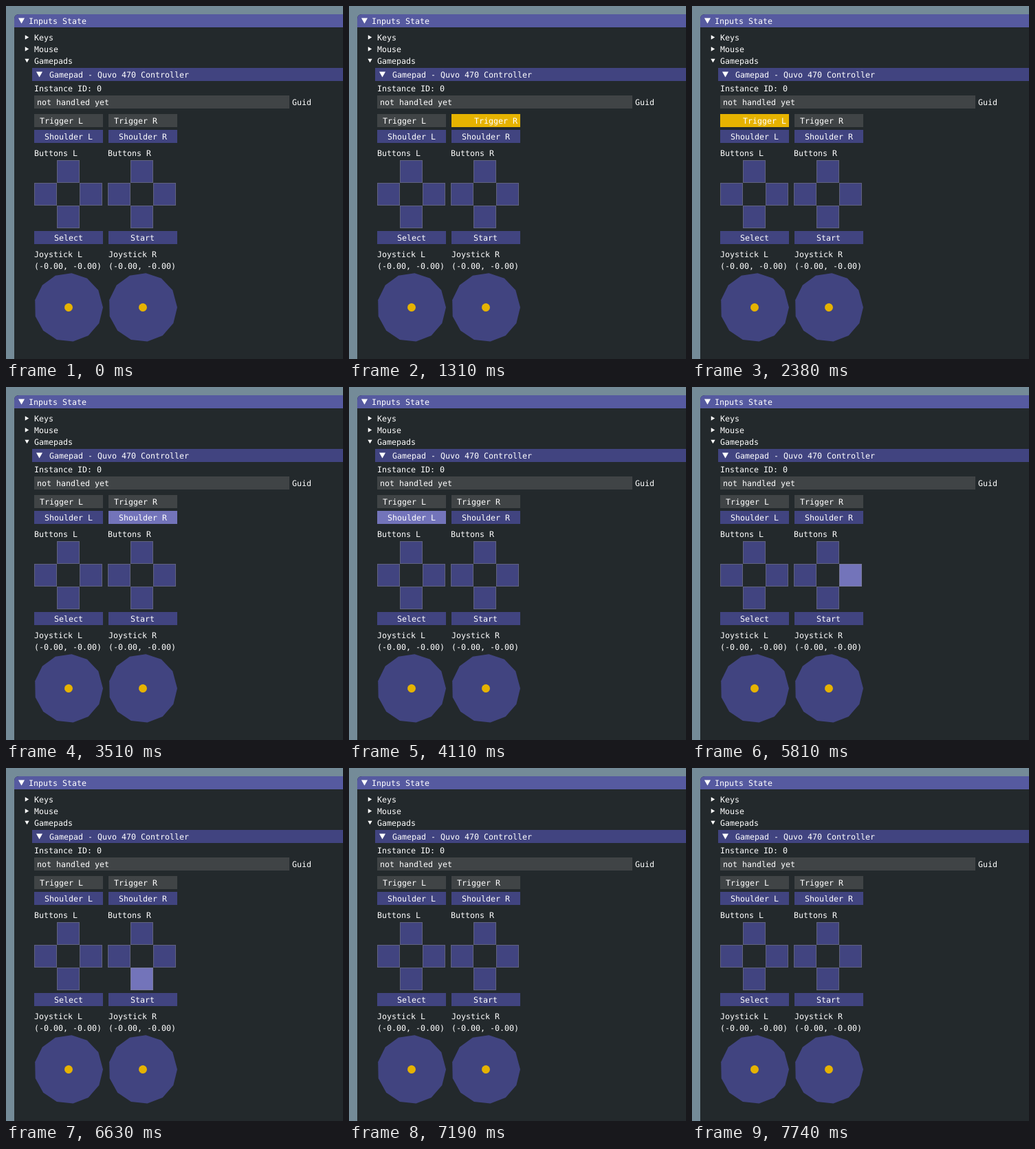
Animation of 490 by 513 pixels, one loop 8000 ms. Source, as an HTML page:

```html
<!DOCTYPE html>
<html lang="en">
<head>
<meta charset="utf-8">
<title>Inputs State</title>
<style>
  html, body { margin: 0; width: 100%; height: 100%; overflow: hidden; background: #748b98; }
  svg { display: block; }
  text {
    font: 11.63px "DejaVu Sans Mono", monospace;
    fill: #fff;
    text-rendering: geometricPrecision;
  }
</style>
</head>
<body>
<svg id="stage" width="490" height="513" viewBox="0 0 490 513"></svg>
<script>
const LOOP = 8000;
const BASE = '#414480', ACTIVE = '#7374ba', FRAME = '#404446', GOLD = '#e6b300';
const stage = document.getElementById('stage');

function add(tag, attrs, content = '') {
  const el = document.createElementNS('http://www.w3.org/2000/svg', tag);
  for (const key in attrs) el.setAttribute(key, attrs[key]);
  el.textContent = content;
  stage.append(el);
  return el;
}
const box = (x, y, width, height, fill) => add('rect', { x, y, width, height, fill });
const label = (x, y, content) => add('text', { x, y }, content);

// Triangle pointing along `turn` degrees
function arrow(x, y, r, turn) {
  add('path', {
    d: `M${r} 0L${-r / 2} ${r * .866}V${-r * .866}Z`, fill: '#fff',
    transform: `translate(${x} ${y}) rotate(${turn}) translate(${-r / 4} 0)`
  });
}

// Thirteen corners whose last side is slightly longer than the others
function disc(cx, cy, r, fill) {
  const step = 2 * Math.PI * 11 / 144;
  const points = Array.from({ length: 13 }, (_, i) =>
    [cx + r * Math.cos(i * step), cy + r * Math.sin(i * step)].map(v => v.toFixed(2)));
  add('polygon', { points: points.join(' '), fill });
}

const switches = [];
function addSwitch(el, on, off) {
  switches.push({ el, on, off });
}

function button(x, y, content, on, off) {
  addSwitch(box(x, y, 100, 19, BASE), on, off);
  label(x + Math.floor((100 - content.length * 7) / 2), y + 14, content);
}

function pad(x, y, times) {
  [[33, 0], [66, 33], [33, 66], [0, 33]].forEach(([dx, dy], i) => {
    addSwitch(box(x + dx, y + dy, 33, 33, BASE), ...(times[i] || []));
    add('rect', {
      x: x + dx + .5, y: y + dy + .5, width: 32, height: 32,
      fill: 'none', stroke: '#808080', 'stroke-opacity': .5
    });
  });
}

// Each key is [time, level]; the level holds until the next key
function trigger(x, y, content, keys) {
  box(x, y, 100, 19, FRAME);
  return { x, keys, bar: box(x, y, 0, 19, GOLD), text: label(x + 8, y + 14, content) };
}

function stick(x, side) {
  label(x, 365, 'Joystick ' + side);
  label(x, 382, '(-0.00, -0.00)');
  disc(x + 50, 438, 50, BASE);
  disc(x + 50, 438, 6, GOLD);
}

// Window and tree
add('path', { d: 'M12 513V19Q12 12 19 12H490V513Z', fill: '#23292c' });
add('path', { d: 'M12 31V19Q12 12 19 12H490V31Z', fill: '#565aa0' });
arrow(22.5, 21.5, 5.2, 90);
label(33, 26, 'Inputs State');
arrow(30.5, 45.5, 3.64, 0);
label(41, 50, 'Keys');
arrow(30.5, 62.5, 3.64, 0);
label(41, 67, 'Mouse');
arrow(30.5, 79.5, 3.64, 90);
label(41, 84, 'Gamepads');
box(38, 90, 452, 19, BASE);
arrow(48.5, 99.5, 5.2, 90);
label(63, 104, 'Gamepad - Quvo 470 Controller');
label(41, 124, 'Instance ID: 0');
box(41, 130, 371, 19, FRAME);
label(45, 144, 'not handled yet');
label(416, 144, 'Guid');

// Controls
const triggers = [
  trigger(41, 157, 'Trigger L', [[2170, .2], [2240, .5], [2310, .8], [2380, 1],
    [2650, .8], [2720, .5], [2800, .2], [2870, 0]]),
  trigger(149, 157, 'Trigger R', [[1240, .5], [1310, 1], [1590, 0]])
];
button(41, 180, 'Shoulder L', 4110, 4240);
button(149, 180, 'Shoulder R', 3510, 3640);
label(41, 218, 'Buttons L');
label(148, 218, 'Buttons R');
pad(41, 224, [[5350, 5480], null, [7060, 7190], [6280, 6410]]);
pad(148, 224, [[4820, 5020], [5810, 6010], [6630, 6880], [7460, 7740]]);
button(41, 327, 'Select');
button(149, 327, 'Start');
stick(41, 'L');
stick(149, 'R');

function draw(t) {
  for (const { el, on, off } of switches)
    el.setAttribute('fill', t >= on && t < off ? ACTIVE : BASE);
  for (const { x, keys, bar, text } of triggers) {
    const level = keys.reduce((value, [time, next]) => t >= time ? next : value, 0);
    bar.setAttribute('width', level * 100);
    text.setAttribute('x', x + Math.min(level * 100 + 8, 33));
  }
}

const start = performance.now();
function tick() {
  draw((performance.now() - start) % LOOP);
  requestAnimationFrame(tick);
}
tick();
</script>
</body>
</html>
```
